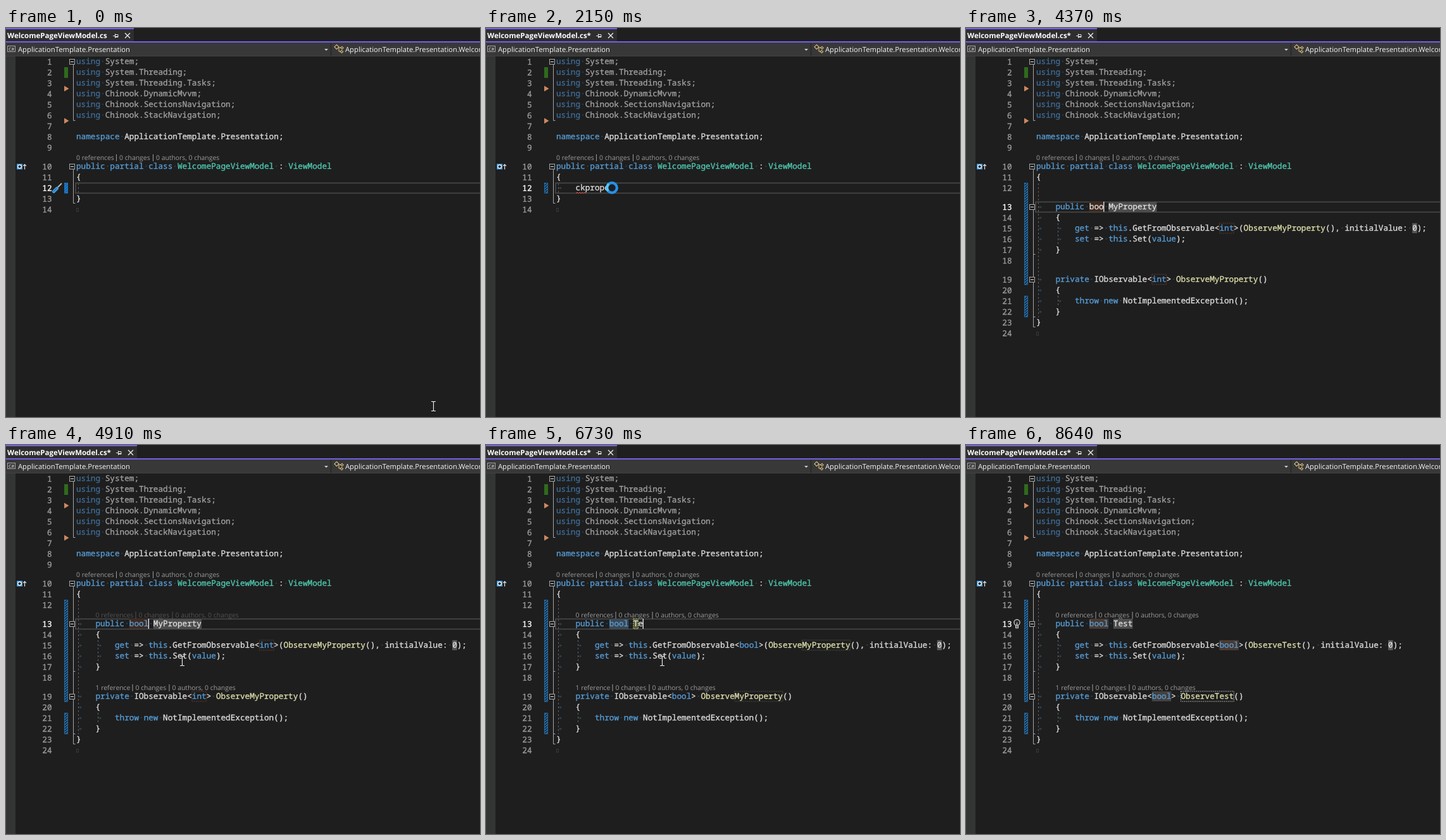
These frames come from a looping animation (749 by 616 pixels, 8.71 s). An HTML page:

```html
<!DOCTYPE html>
<html lang="en">
<head>
<meta charset="utf-8">
<title>Snippet demo</title>
<style>
html, body { margin: 0; width: 100%; height: 100%; overflow: hidden; background: #1e1e1e; }
svg { display: block; width: 749px; height: 616px; }
text { white-space: pre; text-rendering: geometricPrecision; }
.code { font: 500 12.69px "Noto Sans Mono", "DejaVu Sans Mono", monospace; stroke-width: .35px; }
.ui { font: 11.25px "Open Sans", "Noto Sans", sans-serif; fill: #f4f4f4; }
.tab { font-size: 11.5px; font-weight: 700; fill: #fff; }
.lens { font-size: 10.4px; fill: #9c9c9c; }
</style>
</head>
<body>
<svg viewBox="0 0 749 616" xmlns="http://www.w3.org/2000/svg">
  <defs>
    <pattern id="hatch" width="4" height="4" patternUnits="userSpaceOnUse">
      <path d="M-1 5L5 -1M-1 1L1 -1M3 5L5 3" stroke="#2590e6" stroke-width="1.1"/>
    </pattern>
    <clipPath id="stage"><rect width="749" height="616"/></clipPath>
  </defs>
  <g id="base"></g>
  <g id="live" clip-path="url(#stage)"></g>
</svg>
<script>
const LOOP = 8710, CH = 7.617, LEFT = 111;
const TAB_NAME = 5410, SHOW_SNIPPET = 2490, SELECT_TYPE = 3490, TAB_VALUE = 7140, TAB_WRAP = 7420;
const BLUE = '#569cd6', WHITE = '#dcdcdc', TEAL = '#4ec9b0', CREAM = '#dcdcaa', FAINT = '#2b4a5e';
const KEYWORDS = new Set('using namespace public partial class private int bool get set this value throw new'.split(' '));
const TYPES = new Set(['WelcomePageViewModel', 'ViewModel']);

const colX = c => LEFT + c * CH;
const esc = s => s.replace(/&/g, '&amp;').replace(/</g, '&lt;');
const rect = (x, y, w, h, fill, extra = '') =>
  `<rect x="${x}" y="${y}" width="${w}" height="${h}" fill="${fill}" ${extra}/>`;
const path = (d, stroke, width = 1, extra = '') =>
  `<path d="${d}" fill="none" stroke="${stroke}" stroke-width="${width}" ${extra}/>`;
const fillPath = (d, fill) => `<path d="${d}" fill="${fill}"/>`;
const label = (x, y, s, cls = '', extra = '') =>
  `<text class="ui ${cls}" x="${x}" y="${y}" ${extra}>${s}</text>`;

// Middle of an editor row; code lens rows add 13px.
function rowY(n, open = false) {
  const lenses = [10, ...(open ? [13, 19] : [])].filter(row => n >= row).length;
  return 53 + 17 * (n - 1) + 13 * lenses;
}

function tokenColor(word, dim) {
  if (word === ' ') return FAINT;
  if (KEYWORDS.has(word)) return dim ? '#3d6b95' : BLUE;
  if (dim) return '#a0a0a0';
  if (TYPES.has(word)) return TEAL;
  if (word.startsWith('Observe')) return CREAM;
  return WHITE;
}

function code(col, y, line, dim) {
  let out = '', at = col;
  for (const word of line.match(/\w+|\s|[^\w\s]+/g) || []) {
    const color = tokenColor(word, dim);
    out += `<tspan x="${colX(at).toFixed(2)}" fill="${color}" stroke="${color}">${word === ' ' ? '·' : esc(word)}</tspan>`;
    at += word.length;
  }
  return `<text class="code" y="${y + 4}">${out}</text>`;
}

function lineNumber(n, y, current) {
  const color = current ? '#fff' : '#9b9b9b';
  return `<text class="code" x="72.5" y="${y + 5}" text-anchor="end" fill="${color}" stroke="${color}">${n}</text>`;
}

function lens(x, y, plural, opacity = 1) {
  const shift = plural ? 0 : -5;
  const bar = dx => rect(x + dx, y - 9, 1, 11, '#9c9c9c');
  return `<g opacity="${opacity}">` + label(x, y, plural ? '0 references' : '1 reference', 'lens') +
    bar(63 + shift) + label(x + 68 + shift, y, '0 changes', 'lens') +
    bar(121 + shift) + label(x + 126 + shift, y, '0 authors, 0 changes', 'lens') + '</g>';
}

const foldBox = y => rect(100.5, y - 3.5, 8, 8, '#1e1e1e', 'stroke="#a8a8a8"') + path(`M102 ${y + .5}h5`, '#dcdcdc');
const foldLine = (from, to) => path(`M106.5 ${from}V${to}h3`, '#a5a5a5');
const guide = (x, from, to) => path(`M${x} ${from}V${to}`, '#606060', 1, 'stroke-dasharray="3 3"');
const arrow = (x, y) => path(`M${x - 2} ${y + .5}h4M${x} ${y - 1.5}l2 2l-2 2`, FAINT);
const hatchBar = (y, h) => rect(92.5, y + .5, 5, h - 1, 'url(#hatch)', 'stroke="#2079c4" stroke-width=".8"');
const fieldBg = (col, len, y, fill, extra = '') => rect(colX(col), y - 8, len * CH, 16, fill, extra);
const dotted = (col, len, y, color) => fieldBg(col, len, y, 'none', `stroke="${color}" stroke-dasharray="1.5 1.5"`);
const caretAt = (col, y) => rect(colX(col) - .5, y - 8, 1.3, 16, '#f0f0f0');
const rowFrame = y => rect(110, y - 7.5, 660, 16, 'none', 'stroke="#494949" stroke-width="1.6"');

function classIcon(x, y) {
  const box = (dx, dy, s) => `<rect x="${-s / 2}" y="${-s / 2}" width="${s}" height="${s}" fill="#3b3425" stroke="#e6c98c" transform="translate(${x + dx} ${y + dy}) rotate(45)"/>`;
  return path(`M${x - 1} ${y - 2}h5M${x} ${y - 1}v5h3`, '#e6c98c') + box(-3.5, -3, 5) + box(5, -1.5, 3) + box(4.5, 4.5, 3);
}

function drawBase() {
  let s = rect(0, 0, 749, 616, '#1e1e1e') + rect(0, 45, 15, 571, '#333534') +
    rect(0, 0, 749, 21, '#1f1f1f') + rect(0, 23, 749, 22, '#383838') +
    rect(0, 21, 749, 2, '#7160e8') + rect(512, 24, 3, 20, '#2e2e2e') + rect(0, 44, 749, 1, '#424242') +
    rect(2.5, 28.5, 12, 9, 'none', 'stroke="#a8a8a8"') +
    label(4.2, 36, 'C#', '', 'style="font-size:7px"') +
    label(19, 38, 'ApplicationTemplate.Presentation') + fillPath('M503 33h6l-3 3z', '#d0d0d0') +
    classIcon(526, 33) + label(536, 38, 'ApplicationTemplate.Presentation.WelcomePageViewModel');
  const usings = ['System', 'System.Threading', 'System.Threading.Tasks', 'Chinook.DynamicMvvm',
    'Chinook.SectionsNavigation', 'Chinook.StackNavigation'];
  usings.forEach((name, i) => s += code(0, rowY(i + 1), `using ${name};`, true));
  for (let n = 1; n <= 11; n++) s += lineNumber(n, rowY(n));
  s += code(0, rowY(8), 'namespace ApplicationTemplate.Presentation;') +
    code(0, rowY(10), 'public partial class WelcomePageViewModel : ViewModel') +
    code(0, rowY(11), '{') + lens(111, 209, true) +
    foldLine(58, 146.5) + foldBox(53) + foldBox(219) +
    rect(92, 62, 6, 17, '#2f6b1c');
  for (const y of [96, 147]) s += fillPath(`M92 ${y - 4.5}l7.5 4.5l-7.5 4.5z`, '#cf8860');
  // inheritance glyph
  s += rect(17, 215, 9, 9, '#3f9be0') + '<circle cx="21.5" cy="219.5" r="2.7" fill="#1e1e1e" stroke="#fff" stroke-width="1.2"/>' +
    path('M29.5 224v-8M27 218.5l2.5-2.5l2.5 2.5', '#e0e0e0', 1.2);
  return s;
}

function tabStrip(dirty) {
  const d = dirty ? 5 : 0;
  return rect(0, 0, 202 + d, 21, '#2e2e2e') + rect(0, 0, 202 + d, 2, '#7160e8') +
    label(2, 16, 'WelcomePageViewModel.cs' + (dirty ? '*' : ''), 'tab') +
    path(`M${169 + d} 12.5h3M${172.5 + d} 9v7M${173 + d} 10.5h4v4h-4M${173 + d} 13.5h4`, '#e0e0e0') +
    path(`M${188 + d} 8l8 8M${196 + d} 8l-8 8`, '#f0f0f0', 1.3);
}

const screwdriver = y => path(`M75.5 ${y + 6}l5-5`, '#3f9be0', 5, 'stroke-linecap="round"') +
  path(`M75 ${y + 6}l5-5`, '#1d5a8c', 1) + path(`M82 ${y - 1}l6-6`, '#b8b8b8', 2);
const bulb = y => `<circle cx="80.5" cy="${y - 2}" r="4.6" fill="#2a2a2a" stroke="#dcdcdc" stroke-width="1.2"/>` +
  path(`M78.5 ${y + 3}v4h4v-4M78.5 ${y + 5}h4M80.5 ${y + 2}v-4`, '#dcdcdc');

const ITEMS = ['ckdlv', 'ckdlvx', 'ckprop', 'ckpropo', 'ckpropog', 'ckpropt', 'ckproptg', 'ckpropv', 'ckpropvg'];
const snippetIcon = (x, y) => rect(x - 5, y - 5.5, 10, 11, 'none', 'stroke="#dcdcdc"') +
  path(`M${x - 5} ${y + 5.5}h10`, '#1e1e1e', 1.4, 'stroke-dasharray="1 2"');

function popup(typed) {
  const items = ITEMS.filter(s => s.startsWith(typed));
  const h = Math.min(items.length * 20, 171), foot = 266 + h;
  let s = rect(141.5, 265.5, 227, h + 29, '#1f1f1f', 'stroke="#3a3a3a"') +
    `<clipPath id="list"><rect x="142" y="266" width="226" height="${h}"/></clipPath><g clip-path="url(#list)">`;
  items.forEach((name, i) => {
    const y = 276 + 20 * i;
    if (name === 'ckpropo') s += rect(161, y - 10, 190, 19.5, '#3d3d3d');
    s += snippetIcon(150.5, y - 1) + label(163, y + 4, `<tspan font-weight="700">${typed}</tspan>${name.slice(typed.length)}`);
  });
  s += '</g>';
  if (h === 171) {
    s += rect(351, 266, 17, 171, '#2e2e2e') + fillPath('M355 277h9l-4.5-5z', '#999') +
      fillPath('M355 425h9l-4.5 5z', '#999') + rect(355, 287, 9, 8, '#4d4d4d');
  }
  const y = foot + 14;
  return s + path(`M142 ${foot + .5}h226M171.5 ${foot}v28`, '#3a3a3a') +
    path(`M149.5 ${y - 2}v-4h4M157.5 ${y - 6}h4v4M161.5 ${y + 2}v4h-4M153.5 ${y + 6}h-4v-4M152 ${y}h7M155.5 ${y - 3.5}v7`, '#dcdcdc') +
    label(179, y + 4, '{ }', '', 'style="font-size:12px"') + classIcon(214, y) +
    `<g fill="none" stroke="#4fa3e3" stroke-width="1.3"><circle cx="237" cy="${y}" r="2.5"/><circle cx="246" cy="${y}" r="2.5"/><path d="M239.5 ${y}h4"/></g>` +
    rect(267.5, y - 5.5, 9, 7, '#1f1f1f', 'stroke="#e6c98c"') + rect(263.5, y - 1.5, 8, 6, '#3b3425', 'stroke="#e6c98c"') +
    path(`M265 ${y + 1.5}h5M270 ${y - 2.5}h5`, '#e6c98c') +
    rect(291.5, y - 3.5, 13, 9, '#2d2838', 'stroke="#a58ad8"') + path(`M295.5 ${y - 4}v-2.5h5v2.5M294.5 ${y - 3}v8M301.5 ${y - 3}v8`, '#a58ad8') +
    path(`M319 ${y - 5.5}h8M319 ${y + 1.5}h7M319 ${y + 5.5}h11`, '#dcdcdc') + path(`M319 ${y - 1.5}h14M328 ${y + 1.5}h5`, '#4fa3e3', 2) +
    snippetIcon(353, y);
}

const ibeam = (x, y) => path(`M${x - 3} ${y - 7.5}h2.5l1 1l1-1h2.5M${x + .5} ${y - 7}v14M${x - 3} ${y + 7.5}h2.5l1-1l1 1h2.5`, '#f0f0f0', 1.1);
const spinner = (x, y, t) => `<circle cx="${x}" cy="${y}" r="7.8" fill="#1e1e1e" stroke="#2492ea" stroke-width="4.2"/>` +
  path(`M${x - 7.8} ${y}A7.8 7.8 0 0 1 ${x} ${y - 7.8}`, '#55c8f5', 4, `transform="rotate(${(t - 2150) * .36 - 40} ${x} ${y})"`);

const clamp01 = v => Math.max(0, Math.min(1, v));
const ramp = (t, from, to) => clamp01((t - from) / (to - from));
const mix = (a, b, k) => a + (b - a) * k;

function pointer(t) {
  if (t < 2150) {
    const k = 1 - (1 - ramp(t, 40, 460)) ** 1.6;
    return ibeam(mix(675, 201, k), mix(599, 254, k));
  }
  if (t < SELECT_TYPE) {
    if (t < SHOW_SNIPPET) return spinner(199, 253, t);
    const k = ramp(t, 2750, 2890);
    return spinner(mix(210, 300, k), mix(265, 333, k), t);
  }
  if (t < 4600 || t >= 8440) return '';
  const k = ramp(t, 7820, 8440) ** 1.3;
  return ibeam(mix(278, 655, k), mix(342, 628, k));
}

const typed = (t, word, times) => word.slice(0, times.filter(at => t >= at).length);

function beforeSnippet(t) {
  const y = rowY(12), word = typed(t, 'ckpropo', [860, 960, 1150, 1290, 1430, 1560, 1690]);
  let s = '';
  for (const n of [12, 13, 14]) s += lineNumber(n, rowY(n), n === 12);
  s += foldLine(224, 277.5) + guide(114.5, 246, 262) + rowFrame(y) +
    code(0, rowY(13), '}') + rect(111.5, 285.5, 3, 5, 'none', 'stroke="#333a40"');
  s += t < 860 ? rect(92, 245, 6, 17, '#155a9c') + hatchBar(245, 17) + screwdriver(y) : hatchBar(245, 17) + arrow(117, y);
  s += code(4, y, word);
  if (t >= 330) s += caretAt(4 + word.length, y);
  if (t >= 1010 && t < 1820) s += popup(word);
  if (t >= 1820) s += path('M142 262l2-2l2 2l2-2l2 2l2-2l2 2l2-2l2 2', '#e0503f');
  return s;
}

function afterSnippet(t) {
  const row = n => rowY(n, true);
  const named = t >= TAB_NAME, renamed = t >= TAB_VALUE, wrapped = t >= TAB_WRAP;
  const type = t < 4040 ? 'int' : typed(t, 'bool', [4040, 4180, 4310, 4450]);
  const prop = t < 6400 ? 'MyProperty' : typed(t, 'Test', [6400, 6600, 6800, 6940]);
  const linkedType = named ? 'bool' : 'int', linkedProp = renamed ? 'Test' : 'MyProperty';
  const lines = {
    13: [4, `public ${type} ${prop}`],
    14: [4, '{'],
    15: [8, `get => this.GetFromObservable<${linkedType}>(Observe${linkedProp}(), initialValue: 0);`],
    16: [8, 'set => this.Set(value);'],
    17: [4, '}'],
    19: [4, `private IObservable<${linkedType}> Observe${linkedProp}()`],
    20: [4, '{'],
    21: [8, 'throw new NotImplementedException();'],
    22: [4, '}'],
    23: [0, '}']
  };
  const find = (n, word) => lines[n][0] + lines[n][1].indexOf(word);
  const current = t < SELECT_TYPE ? 22 : renamed && !wrapped ? 15 : 13;
  const typing = (t >= 4040 && !named) || (t >= 6400 && !renamed);
  const SEL = '#365880', GRAY = '#4d4d4d';
  const propCol = 12 + type.length, y13 = row(13);
  let s = '';

  for (let n = 12; n <= 24; n++) s += lineNumber(n, row(n), n === current);
  s += foldLine(224, 473.5) + path('M106.5 358.5h3M106.5 457.5h3', '#a5a5a5') + foldBox(283) + foldBox(398) +
    hatchBar(245, 162) + hatchBar(424, 34) + guide(114.5, 246, 458) + guide(145.5, 309, 342) + guide(145.5, 424, 441) +
    rect(111.5, 481.5, 3, 5, 'none', 'stroke="#333a40"');
  for (const n in lines) {
    if (lines[n][0] >= 4) s += arrow(117, row(n));
    if (lines[n][0] === 8) s += arrow(148, row(n));
  }
  if (current === 22 || typing) s += rowFrame(row(current));

  // snippet fields
  if (t < 3760) for (const n of [20, 22]) s += fieldBg(4, 1, row(n), '#113d6f');
  if (t >= SELECT_TYPE) {
    const typeBg = t < 4040 ? SEL : !named ? '#3f2a20' : !wrapped ? '#3c4854' : t < 8640 ? SEL : '#493a32';
    s += fieldBg(11, type.length, y13, typeBg);
    if (t >= 6400 && !renamed) s += fieldBg(propCol, Math.max(1, prop.length - 1), y13, '#515833', 'stroke="#c8cc8c" stroke-dasharray="2 1.5"');
    else s += fieldBg(propCol, prop.length, y13, named && !renamed ? SEL : GRAY);
    s += fieldBg(find(15, '0);'), 1, row(15), current === 15 ? SEL : '#555');
    for (const n of [15, 19]) {
      const at = find(n, `<${linkedType}>`) + 1;
      if (!named) s += dotted(at, 3, row(n), '#70402f');
      else if (!renamed) s += dotted(find(n, 'MyProperty'), 10, row(n), '#55554a');
      else if (wrapped) s += fieldBg(at, 4, row(n), n === 15 ? '#493a32' : '#45403c');
    }
    if (renamed) s += dotted(find(19, 'Observe' + linkedProp), 11, row(19), '#d0d0d0');
  }

  for (const n in lines) s += code(lines[n][0], row(n), lines[n][1]);
  s += lens(141.5, 273, true, ramp(t, 4780, 5100)) + lens(141.5, 388, false, ramp(t, 4450, 4800));

  if (t < SELECT_TYPE) s += caretAt(5, row(22));
  else if (!named) s += caretAt(11 + type.length, y13);
  else if (!renamed) s += t >= 5880 && t < 6140 ? '' : caretAt(propCol + prop.length, y13);
  else if (wrapped && t < 8640) s += caretAt(15, y13);
  if (t >= 3090 && t < SELECT_TYPE) s += screwdriver(row(22));
  if (t >= 7880) s += bulb(y13);
  return s;
}

const live = document.getElementById('live');
document.getElementById('base').innerHTML = drawBase();
let shown = '';

function render(t) {
  const next = tabStrip(t >= 860) + (t < SHOW_SNIPPET ? beforeSnippet(t) : afterSnippet(t)) + pointer(t);
  if (next !== shown) live.innerHTML = shown = next;
}

const start = performance.now();
function tick() {
  render((performance.now() - start) % LOOP);
  requestAnimationFrame(tick);
}
tick();
</script>
</body>
</html>
```
